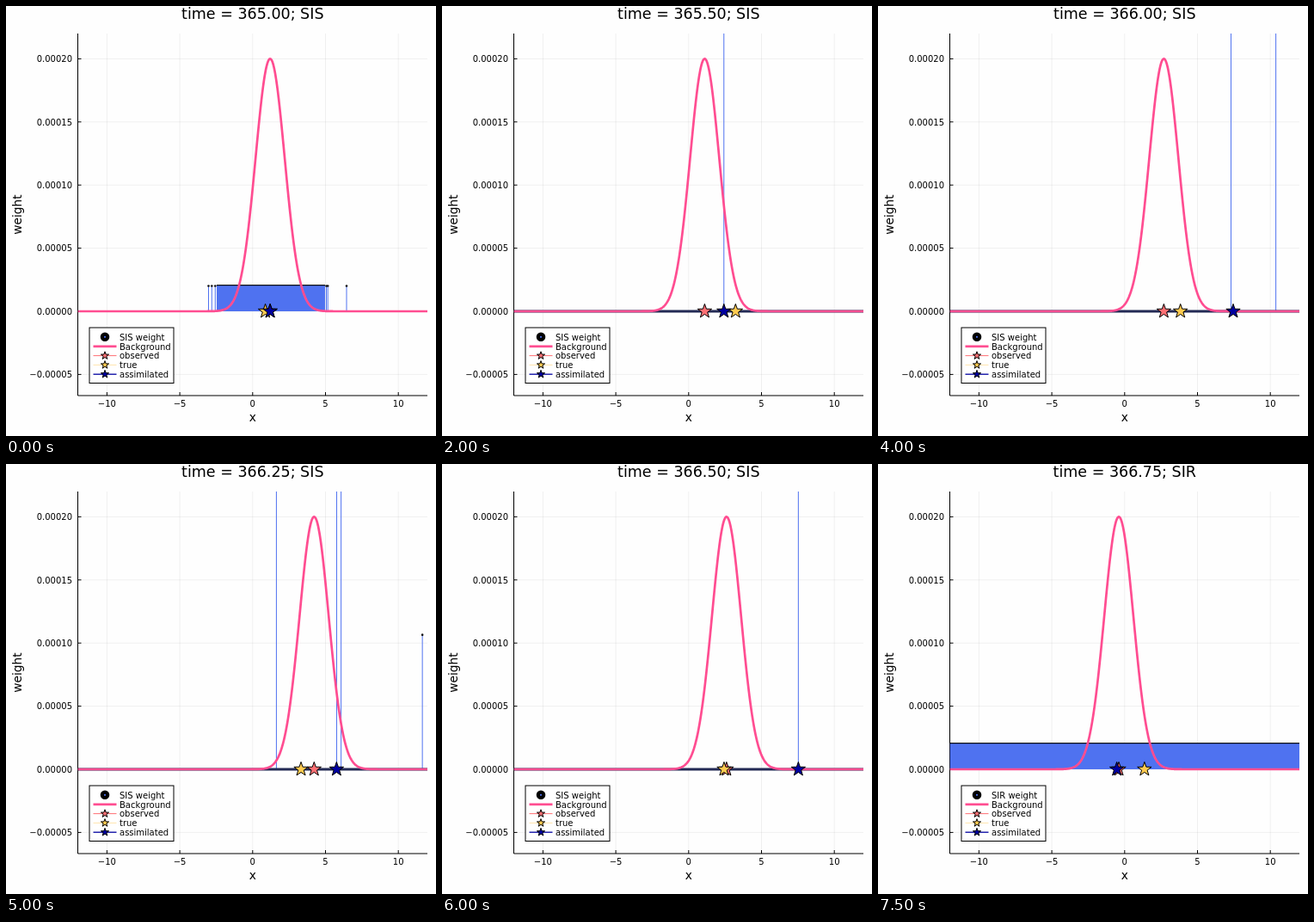
Write an HTML page that moves like this. It is 500x500 px and loops after 8 s.

```html
<!DOCTYPE html>
<html lang="en">
<head>
<meta charset="utf-8">
<title>Particle filter weights</title>
<style>
  html, body { margin: 0; width: 100%; height: 100%; overflow: hidden; background: #fefefe; }
  svg { display: block; width: 100vw; height: 100vh; }
  text { font: 10px "DejaVu Sans", sans-serif; fill: #000; }
  .label { font-size: 13.75px; }
  .title { font-size: 17.5px; }
  .mid { text-anchor: middle; }
  .end { text-anchor: end; }
  .axis { fill: none; stroke: #000; stroke-width: 1; }
  .grid { stroke: #000; stroke-opacity: .06; stroke-width: 1; }
  .stick { stroke: #4f72f0; stroke-width: 1; }
  .band { fill: #4f72f0; }
  .caps { stroke: #111; stroke-width: 1.3; }
  .floor { stroke: #232a55; stroke-width: 2.8; }
  .curve { fill: none; stroke: #ff4d91; stroke-width: 2.7; stroke-linejoin: round; }
  .star { stroke: #000; stroke-width: 1; stroke-linejoin: miter; }
</style>
</head>
<body>
<svg viewBox="0 0 500 500">
  <defs><clipPath id="plot"><rect x="83.5" y="32" width="407" height="421"/></clipPath></defs>
  <g id="frame"></g>
  <g id="data" clip-path="url(#plot)"></g>
  <g id="legend"></g>
  <text id="title" class="title mid" x="286.8" y="15"></text>
</svg>
<script>
const LEFT = 83.5, RIGHT = 490, TOP = 32, BOTTOM = 453, ZERO = 355, CAP = 325;
const STEP_MS = 500;
const COLORS = { observed: '#ff7074', truth: '#ffca50', assimilated: '#0000a0' };
const px = x => 286.8 + 16.94 * x;
const py = w => ZERO - w * 73.4 / 5;      // w in units of 1e-5
const byId = id => document.getElementById(id);

// Each step is shown twice: first the SIS filter, then the SIR filter.
// sticks: [x, weight]; weights above the top of the plot are cut off.
const steps = [
  { obs: 1.2, truth: .87,
    sis: { mean: 1.2, band: [245, 371], extra: [235.5, 239.3, 243.3, 372.5, 374.2, 396] },
    sir: { mean: 1.2, band: [245, 371], extra: [235.5, 239.3, 243.3, 372.5, 374.2, 396] } },
  { obs: 2, truth: 2.1,
    sis: { mean: 2.4, sticks: [[2.4, 30]] },
    sir: { mean: 2.1, band: [LEFT, RIGHT] } },
  { obs: 1.1, truth: 3.22,
    sis: { mean: 2.42, sticks: [[2.42, 30]] },
    sir: { mean: 1.3, band: [LEFT, RIGHT] } },
  { obs: 5.52, truth: 3.8,
    sis: { mean: 14, sticks: [] },
    sir: { mean: 5.3, band: [122, RIGHT], extra: [114, 118] } },
  { obs: 2.69, truth: 3.83,
    sis: { mean: 7.45, sticks: [[7.3, 30], [10.38, 30]] },
    sir: { mean: 2.8, band: [96, RIGHT], extra: [91, 94] } },
  { obs: 4.22, truth: 3.32,
    sis: { mean: 5.76, sticks: [[1.63, 30], [5.77, 30], [6.07, 30], [11.65, 10.65]] },
    sir: { mean: 4.1, band: [LEFT, RIGHT] } },
  { obs: 2.6, truth: 2.43,
    sis: { mean: 7.53, sticks: [[7.53, 30]] },
    sir: { mean: 2.7, band: [LEFT, RIGHT] } },
  { obs: -.4, truth: 1.36,
    sis: { mean: 4.6, sticks: [[4.6, 30]] },
    sir: { mean: -.54, band: [LEFT, RIGHT] } }
];

const line = (x1, y1, x2, y2, attrs) =>
  `<line x1="${x1}" y1="${y1}" x2="${x2}" y2="${y2}" ${attrs}/>`;
const text = (x, y, str, cls = '') => `<text x="${x}" y="${y}" class="${cls}">${str}</text>`;

function star(x, y, r, color) {
  let points = '';
  for (let i = 0; i < 10; i++) {
    const a = i * Math.PI / 5, d = i % 2 ? r * .4 : r;
    points += `${(x + d * Math.sin(a)).toFixed(2)},${(y - d * Math.cos(a)).toFixed(2)} `;
  }
  return `<polygon class="star" points="${points}" fill="${color}"/>`;
}

function bell(center) {
  let points = '';
  for (let x = LEFT; x <= RIGHT; x += .5) {
    const z = (x - px(center)) / 16.94;
    points += `${x},${py(20 * Math.exp(-z * z / 2)).toFixed(2)} `;
  }
  return `<polyline class="curve" points="${points}"/>`;
}

const stick = (x, y) => line(x, y, x, ZERO, 'class="stick"') +
  `<circle cx="${x}" cy="${y}" r="1.3" fill="#111"/>`;

function weights({ band, extra = [], sticks = [] }) {
  if (!band) {
    return sticks.map(([x, w]) => stick(px(x), py(w))).join('') +
      line(LEFT, ZERO, RIGHT, ZERO, 'class="floor"');
  }
  const [a, b] = band;
  return `<rect class="band" x="${a}" y="${CAP}" width="${b - a}" height="${ZERO - CAP}"/>` +
    line(a, CAP - .3, b, CAP - .3, 'class="caps"') +
    extra.map(x => stick(x, CAP + .5)).join('');
}

function drawFrame() {
  let out = '';
  for (let x = -10; x <= 10; x += 5) {
    const p = px(x);
    out += line(p, TOP, p, BOTTOM, 'class="grid"') + line(p, BOTTOM, p, BOTTOM - 4, 'class="axis"') +
      text(p, 466, String(x).replace('-', '−'), 'mid');
  }
  for (let w = -5; w <= 20; w += 5) {
    const p = py(w);
    out += line(LEFT, p, RIGHT, p, 'class="grid"') + line(LEFT, p, LEFT + 4, p, 'class="axis"') +
      text(77, p + 3.7, (w / 1e5).toFixed(5).replace('-', '−'), 'end');
  }
  byId('frame').innerHTML = out +
    `<path class="axis" d="M${LEFT} ${TOP}V${BOTTOM}H${RIGHT}"/>` +
    text(286.8, 483, 'x', 'label mid') +
    '<text class="label mid" transform="translate(18.3 242.5) rotate(-90)">weight</text>';
}

function drawLegend() {
  const rows = [['observed', 'observed', '#ff7074', 1], ['true', 'truth', '#ffd98a', .7],
                ['assimilated', 'assimilated', '#0000a0', 1.3]];
  byId('legend').innerHTML =
    '<rect x="97" y="374" width="98" height="64.5" fill="#fff" stroke="#000"/>' +
    '<circle cx="115" cy="384.8" r="3.2" fill="#4f72f0" stroke="#000" stroke-width="4.2"/>' +
    '<text id="kind" x="132" y="388.6"></text>' +
    line(101.5, 395.8, 128.5, 395.8, 'class="curve"') + text(132, 399.5, 'Background') +
    rows.map(([label, key, color, width], i) => {
      const y = 406.6 + 10.8 * i;
      return line(101.5, y, 128.5, y, `stroke="${color}" stroke-width="${width}"`) +
        star(115, y, 4.8, COLORS[key]) + text(132, y + 3.7, label);
    }).join('');
}

let shown = -1;
function show(n) {
  const i = n >> 1, step = steps[i], kind = n % 2 ? 'SIR' : 'SIS';
  const filter = step[kind.toLowerCase()];
  byId('title').textContent = `time = ${(365 + i / 4).toFixed(2)}; ${kind}`;
  byId('kind').textContent = `${kind} weight`;
  byId('data').innerHTML = weights(filter) + bell(step.obs) +
    star(px(step.obs), ZERO, 8.6, COLORS.observed) +
    star(px(step.truth), ZERO, 8.6, COLORS.truth) +
    star(px(filter.mean), ZERO, 8.6, COLORS.assimilated);
}

function tick() {
  const n = Math.floor(performance.now() / STEP_MS) % (steps.length * 2);
  if (n !== shown) show(shown = n);
  requestAnimationFrame(tick);
}

drawFrame();
drawLegend();
tick();
</script>
</body>
</html>
```
